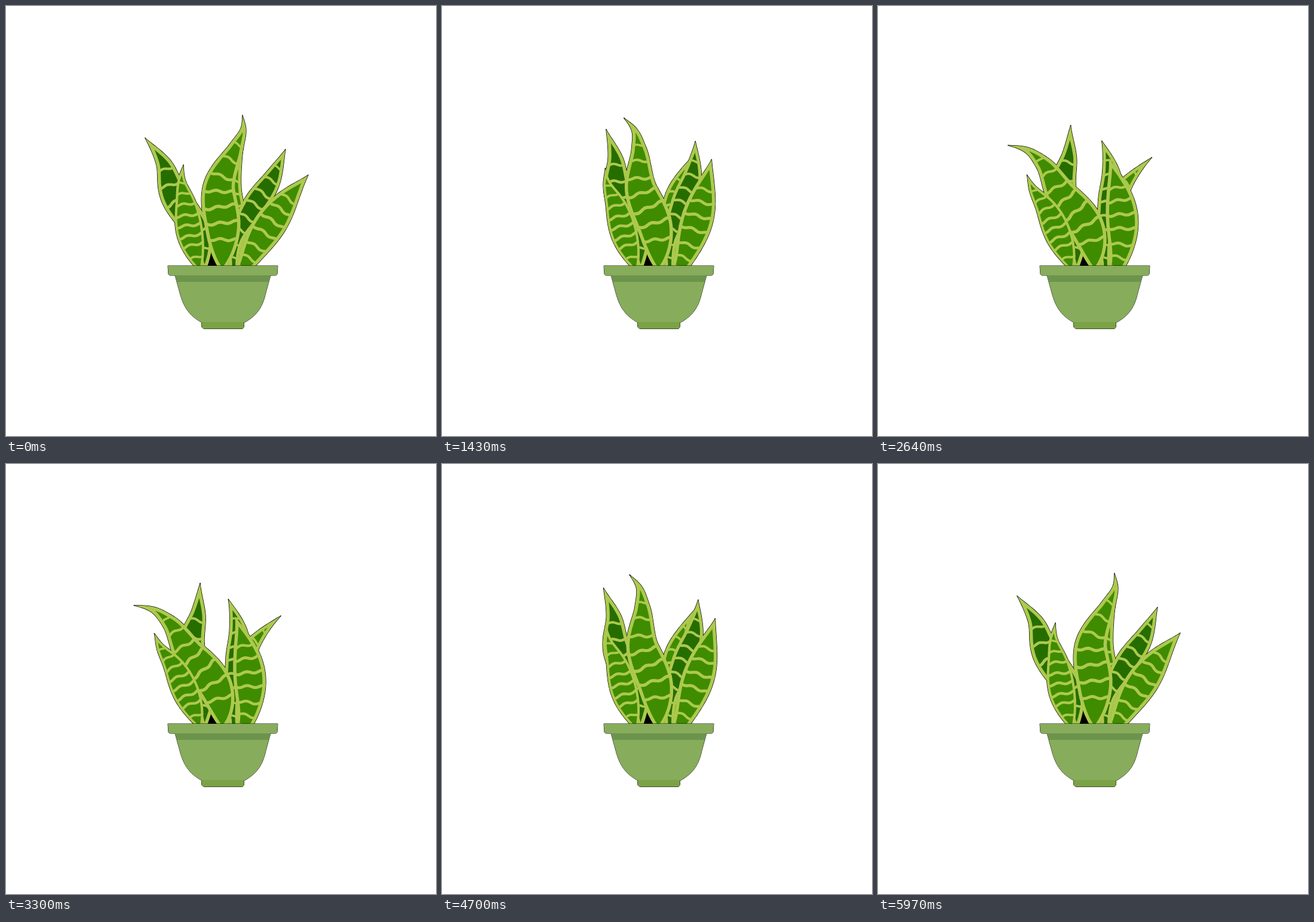
Animation of 720 by 720 pixels, one loop 6000 ms. Source, as an HTML page with a canvas:

```html
<!DOCTYPE html>
<html lang="en">
<head>
<meta charset="utf-8">
<title>Potted plant</title>
<style>
html, body { margin: 0; width: 100%; height: 100%; overflow: hidden; background: #fff; }
canvas { display: block; width: 720px; height: 720px; }
</style>
</head>
<body>
<canvas id="stage" width="720" height="720"></canvas>
<script>
const ctx = document.getElementById('stage').getContext('2d');
const LOOP = 6000, TURN = 3040;
const LIGHT = '#adc94e', MID = '#3f8c00', DARK = '#266d00';

// spine: key points from base to tip at rest; turn: degrees at the tip;
// curl: how the turn grows along the leaf; width, foot: half-widths;
// swell: moves the widest part; first, step: places of the bands.
const leaves = {
  hidden: { color: MID, turn: 18.7, curl: 1, width: 20, foot: 6, swell: 0.75, border: 5, first: 0.12, step: 0.1,
    spine: [[378, 442], [381, 365], [380, 305], [397, 238]] },
  backLeft: { color: DARK, turn: 23, curl: 1, width: 24, foot: 3, swell: 0.9, border: 5.5, first: 0.15, step: 0.118,
    spine: [[333, 442], [326, 385], [282, 318], [264, 264], [233, 221]] },
  backRight: { color: DARK, turn: -26.2, curl: 0.85, width: 19, foot: 8, swell: 1.25, border: 5, first: 0.08, step: 0.108,
    spine: [[381, 442], [386, 388], [415, 335], [444, 292], [468, 240]] },
  tall: { color: MID, turn: -44.2, curl: 1.1, width: 30, foot: 3, swell: 0.7, border: 5.5, first: 0.185, step: 0.103,
    spine: [[362, 442], [363, 372], [357, 302], [384, 240], [397, 208], [396, 183]] },
  frontLeft: { color: MID, turn: -17.2, curl: 1, width: 22, foot: 3, swell: 0.8, border: 4, first: 0.12, step: 0.1,
    spine: [[325, 442], [309, 385], [301, 332], [294, 295], [297, 266]] },
  frontRight: { color: MID, turn: -39.5, curl: 0.65, width: 25, foot: 13, swell: 0.98, border: 5.5, first: 0.11, step: 0.122,
    spine: [[396, 442], [428, 387], [470, 326], [506, 283]] }
};
const all = Object.values(leaves);

const soil = [[324, 438], [347, 398], [392, 438]];
const gap = [[400, 385], [414, 348], [447, 325], [414, 372]];

// Catmull-Rom samples through the given points
function spline(pts) {
  const out = [], last = pts.length - 1;
  for (let i = 0; i < last; i++) {
    const a = pts[Math.max(i - 1, 0)], b = pts[i], c = pts[i + 1], d = pts[Math.min(i + 2, last)];
    for (let s = 0; s < 1; s += 0.0625) {
      out.push([0, 1].map(k => b[k] + 0.5 * s * (c[k] - a[k] +
        s * (2 * a[k] - 5 * b[k] + 4 * c[k] - d[k] + s * (3 * (b[k] - c[k]) + d[k] - a[k])))));
    }
  }
  out.push(pts[last]);
  return out;
}

function height(leaf, [x, y]) {
  const base = leaf.spine[0], tip = leaf.spine.at(-1);
  return Math.hypot(x - base[0], y - base[1]) / Math.hypot(tip[0] - base[0], tip[1] - base[1]);
}

// Turns a point about the base, further the higher it sits.
function twist(leaf, p, u) {
  const [bx, by] = leaf.spine[0], dx = p[0] - bx, dy = p[1] - by;
  const a = leaf.turn * Math.PI / 180 * u * height(leaf, p) ** leaf.curl;
  const k = 1 + 0.0008 * Math.min(leaf.turn, 0) * u ** 4;
  const c = Math.cos(a) * k, s = Math.sin(a) * k;
  return [bx + dx * c - dy * s, by + dx * s + dy * c];
}

function halfWidth(leaf, v) {
  const rest = Math.max(0, 1 - v);
  const arch = Math.max(0, Math.sin(Math.PI * Math.min(1, v) ** leaf.swell));
  return leaf.width * arch ** 1.15 + leaf.foot * rest ** 3;
}

// Cross-sections of the bent leaf: centre, direction, half-width
function sections(leaf, u) {
  const bent = leaf.samples.map(p => twist(leaf, p, u));
  return bent.map(([x, y], i) => {
    const a = bent[Math.max(i - 1, 0)], b = bent[Math.min(i + 1, bent.length - 1)];
    const len = Math.hypot(b[0] - a[0], b[1] - a[1]);
    const v = height(leaf, leaf.samples[i]);
    return { x, y, v, tx: (b[0] - a[0]) / len, ty: (b[1] - a[1]) / len, half: halfWidth(leaf, v) };
  });
}

// Point beside the spine; side -1 is the left edge, 1 the right.
function beside(s, side, along = 0) {
  const off = side * s.half;
  return [s.x - s.ty * off + s.tx * along, s.y + s.tx * off + s.ty * along];
}

function trace(pts, closed) {
  const path = new Path2D();
  pts.forEach(p => path.lineTo(...p));
  if (closed) path.closePath();
  return path;
}

function fill(path, color) {
  ctx.fillStyle = color;
  ctx.fill(path);
}

function stroke(path, color, width) {
  ctx.strokeStyle = color;
  ctx.lineWidth = width;
  ctx.stroke(path);
}

function outline(cuts) {
  const left = cuts.map(s => beside(s, -1)), right = cuts.map(s => beside(s, 1));
  return trace([...left, ...right.reverse()], true);
}

function band(s) {
  const pts = [];
  for (let side = -1; side <= 1; side += 0.1) {
    pts.push(beside(s, side, 1.8 * Math.sin(side * s.half * 0.23 + 2.6)));
  }
  stroke(trace(pts), LIGHT, 2.8 + s.half / 12);
}

function drawLeaf(leaf, cuts, path) {
  ctx.save();
  ctx.clip(path);
  fill(path, leaf.color);
  for (let v = leaf.first; v < 0.84; v += leaf.step) band(cuts.find(s => s.v >= v));
  stroke(path, LIGHT, leaf.border * 2);
  ctx.restore();
}

const rim = new Path2D('M271 435H455L454 449Q453 451 451 451H275Q273 451 272 449Z');
const bowl = new Path2D('M283 451H443L435 480C430 503 421 518 399 530H328C306 518 297 503 291 480Z');
const foot = new Path2D('M327.5 529H398.5V537L396 540.5H331L327.5 537Z');
const shade = new Path2D('M283 451H443L440 462H286Z');

function drawPot() {
  [bowl, foot, rim].forEach(p => stroke(p, '#000', 1));
  fill(bowl, '#87ac5b');
  fill(shade, '#6c944c');
  fill(foot, '#7ba246');
  fill(rim, '#87ac5b');
}

function draw(now) {
  const t = now % LOOP;
  const s = t < TURN ? t / TURN : (LOOP - t) / (LOOP - TURN);
  const u = s * s * (3 - 2 * s);
  const cuts = all.map(leaf => sections(leaf, u));
  const paths = cuts.map(outline);

  ctx.fillStyle = '#fff';
  ctx.fillRect(0, 0, 720, 720);
  ctx.lineJoin = 'round';
  paths.forEach(p => stroke(p, '#000', 1.5));
  fill(trace(soil, true), '#000');
  fill(trace(gap.map(p => twist(leaves.backRight, p, u)), true), '#000');
  all.forEach((leaf, i) => drawLeaf(leaf, cuts[i], paths[i]));
  drawPot();
}

all.forEach(leaf => { leaf.samples = spline(leaf.spine); });
const start = performance.now();
function tick() {
  draw(performance.now() - start);
  requestAnimationFrame(tick);
}
tick();
</script>
</body>
</html>
```
